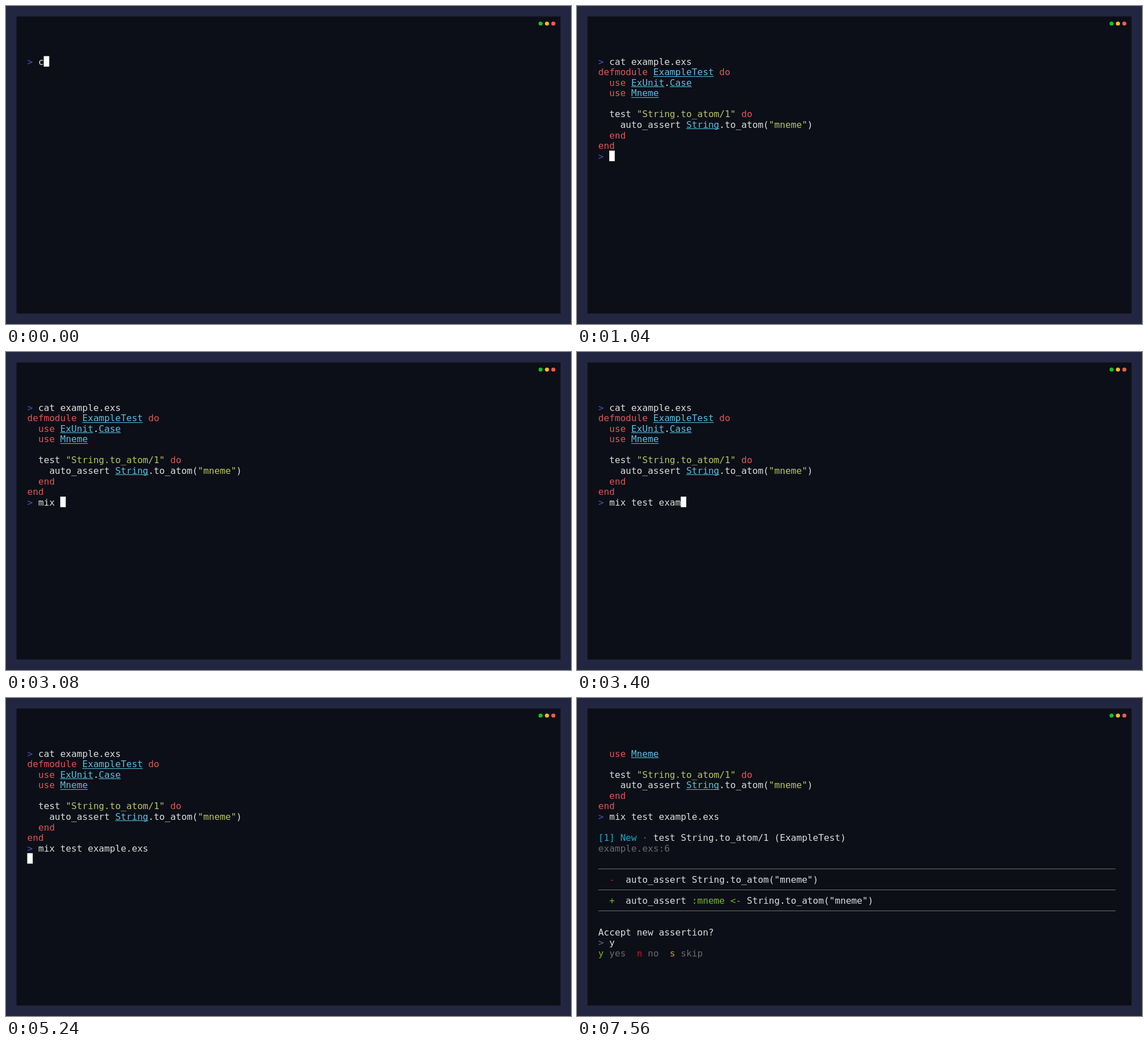
Recreate the animation shown at these times as an HTML page with a canvas. Size 998 px wide and 561 px high, loop 8000 ms.

```html
<!DOCTYPE html>
<html lang="en">
<head>
<meta charset="utf-8">
<title>Terminal</title>
<style>
  html, body { margin: 0; width: 100%; height: 100%; overflow: hidden; background: #222640; }
  canvas { display: block; width: 998px; height: 561px; }
</style>
</head>
<body>
<canvas id="stage" width="998" height="561"></canvas>
<script>
const ctx = document.getElementById('stage').getContext('2d');
const LOOP = 8000, FRAME = 40;
const LEFT = 37.5, TOP = 88.4, CELL = 9.72, ROW = 18.53, BASELINE = 15.4;
const COLS = 94;

const colors = {
  text: '#dddddd', prompt: '#4f4fc4', keyword: '#e05656', name: '#5cbee2',
  string: '#bac464', info: '#1ba7c0', dim: '#696b70',
  minus: '#c8141a', plus: '#76b81c', skip: '#d9a01c'
};

// Each line is a flat list of style, text pairs; "name" runs are underlined.
const source = [
  ['keyword', 'defmodule ', 'name', 'ExampleTest', 'keyword', ' do'],
  ['keyword', '  use ', 'name', 'ExUnit', 'text', '.', 'name', 'Case'],
  ['keyword', '  use ', 'name', 'Mneme'],
  [],
  ['text', '  test ', 'string', '"String.to_atom/1"', 'keyword', ' do'],
  ['text', '    auto_assert ', 'name', 'String', 'text', '.to_atom(', 'string', '"mneme"', 'text', ')'],
  ['keyword', '  end'],
  ['keyword', 'end']
];
const RULE = 'rule';
const review = [
  [],
  ['info', '[1] New', 'dim', ' · ', 'text', 'test String.to_atom/1 (ExampleTest)'],
  ['dim', 'example.exs:6'],
  [],
  RULE,
  ['minus', '  -  ', 'text', 'auto_assert String.to_atom("mneme")'],
  RULE,
  ['plus', '  +  ', 'text', 'auto_assert ', 'plus', ':mneme <-', 'text', ' String.to_atom("mneme")'],
  RULE,
  [],
  ['text', 'Accept new assertion?']
];
const choices = ['plus', 'y', 'dim', ' yes  ', 'minus', 'n', 'dim', ' no  ', 'skip', 's', 'dim', ' skip'];

const showCommand = 'cat example.exs';
const testCommand = 'mix test example.exs';
const shell = (command, style = 'prompt') => [style, '> ', 'text', command];

function typed(command, elapsed) {
  const count = Math.floor(1.08 + Math.floor(elapsed / FRAME) * 7 / 6);
  return command.slice(0, Math.max(0, count));
}

function screenAt(t) {
  if (t < 1040) {
    const input = typed(showCommand, t);
    return { lines: [shell(input)], cursor: [2 + input.length, 0] };
  }
  if (t < 5480) {
    const input = t < 2960 ? '' : typed(testCommand, t - 2960);
    return {
      lines: [shell(showCommand), ...source, shell(input)],
      cursor: t < 4160 ? [2 + input.length, 9] : [0, 10]
    };
  }
  const answer = t < 6960 ? '' : 'y';
  return {
    lines: [...source.slice(2), shell(testCommand), ...review, shell(answer, 'dim'), choices],
    cursor: [2 + answer.length, 18]
  };
}

const hiddenSpans = [[1640, 2200], [2800, 2960], [4680, 5240], [6080, 6640], [7560, LOOP]];
const cursorVisible = t => !hiddenSpans.some(([from, to]) => t >= from && t < to);

function drawLine(line, row) {
  const top = TOP + row * ROW;
  if (line === RULE) {
    ctx.fillStyle = '#707174';
    ctx.fillRect(LEFT, Math.round(top + ROW / 2 - 0.5), COLS * CELL, 1);
    return;
  }
  let col = 0;
  for (let i = 0; i < line.length; i += 2) {
    const style = line[i], text = line[i + 1];
    const x = LEFT + col * CELL;
    ctx.fillStyle = colors[style];
    [...text].forEach((char, n) => ctx.fillText(char, x + n * CELL, top + BASELINE));
    if (style === 'name') ctx.fillRect(x, Math.round(top + 16.7), text.length * CELL, 1);
    col += text.length;
  }
}

function drawWindow() {
  ctx.fillStyle = '#222640';
  ctx.fillRect(0, 0, 998, 561);
  ctx.fillStyle = '#0c0f17';
  ctx.fillRect(18.5, 18.5, 961, 524);
  ['#10c624', '#fbbd18', '#f95a4f'].forEach((color, i) => {
    ctx.fillStyle = color;
    ctx.beginPath();
    ctx.arc(944.2 + i * 11.3, 31, 3.6, 0, Math.PI * 2);
    ctx.fill();
  });
}

function draw(t) {
  drawWindow();
  ctx.font = '16.145px "DejaVu Sans Mono", monospace';
  ctx.textBaseline = 'alphabetic';
  const { lines, cursor: [col, row] } = screenAt(t);
  lines.forEach(drawLine);
  if (cursorVisible(t)) {
    ctx.fillStyle = '#ffffff';
    ctx.fillRect(LEFT + col * CELL, TOP + row * ROW, CELL, ROW);
  }
}

const start = performance.now();
function tick() {
  draw((performance.now() - start) % LOOP);
  requestAnimationFrame(tick);
}
tick();
</script>
</body>
</html>
```
